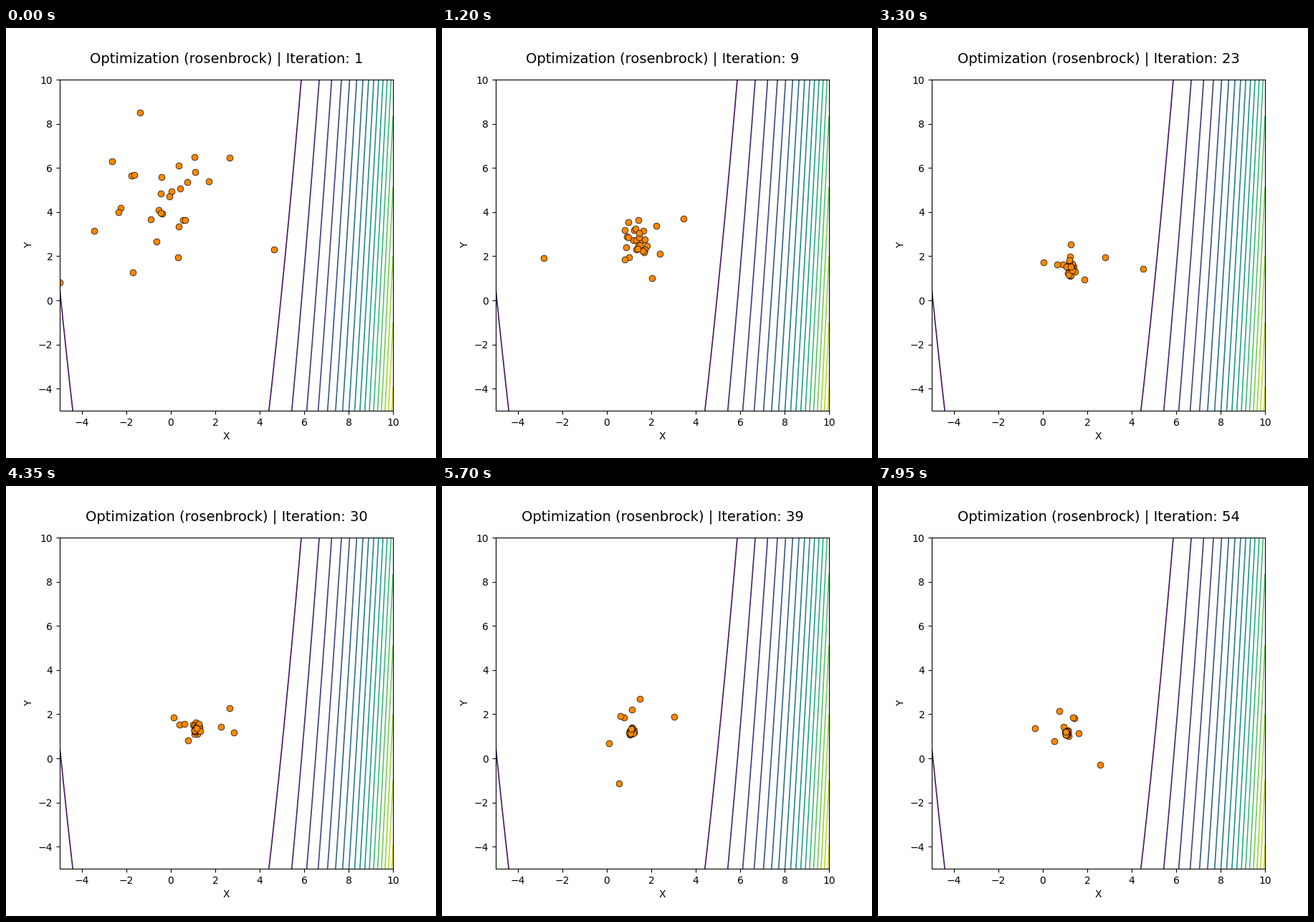
Write a matplotlib script that moves like this. It is 600 px wide and 600 px high and loops after 8 s.

```python
import numpy as np
import matplotlib.pyplot as plt
from matplotlib.animation import FuncAnimation

LOW, HIGH = -5, 10
AGENTS, SCOUTS = 30, 8
TICK_MS, STEP_MS, LOOP_MS = 50, 150, 8000


def rosenbrock(x, y):
    return 100 * (y - x**2) ** 2 + (1 - x) ** 2


def swarm(iteration):
    """Agents hop around a centre that slides down the valley y = x**2."""
    rng = np.random.default_rng(iteration)
    age = iteration - 1
    early, late = np.exp(-age / 3), np.exp(-age / 30)

    y = 1.13 + 3.37 * np.exp(-age / 10)
    x = np.sqrt(y) - 2.6 * early
    spread = early * np.array([2.2, 1.6]) + late * np.array([0.22, 0.36])
    core = rng.normal((x, y), spread, (AGENTS - SCOUTS, 2))

    # Scouts stray much further than the core.
    reach = 0.4 + 0.8 * late
    scouts = rng.laplace((x, y + 0.3), reach, (SCOUTS, 2))
    return np.clip(np.vstack([scouts, core]), LOW, HIGH)


fig, ax = plt.subplots(figsize=(6, 6), dpi=100)
axis = np.linspace(LOW, HIGH, 100)
X, Y = np.meshgrid(axis, axis)
ax.contour(X, Y, rosenbrock(X, Y), levels=20, cmap="viridis", linewidths=1.2)
dots = ax.scatter([], [], s=40, c="#ff8800", edgecolors="black",
                  linewidths=0.5, zorder=2)
title = ax.text(0.5, 1.05, "", transform=ax.transAxes, ha="center", fontsize=14)
ax.set(xlim=(LOW, HIGH), ylim=(LOW, HIGH), xlabel="X", ylabel="Y")


def update(tick):
    iteration = tick * TICK_MS // STEP_MS + 1
    dots.set_offsets(swarm(iteration))
    title.set_text(f"Optimization (rosenbrock) | Iteration: {iteration}")
    return dots, title


anim = FuncAnimation(fig, update, frames=LOOP_MS // TICK_MS, interval=TICK_MS,
                     repeat=True, repeat_delay=0)
plt.show()
```
